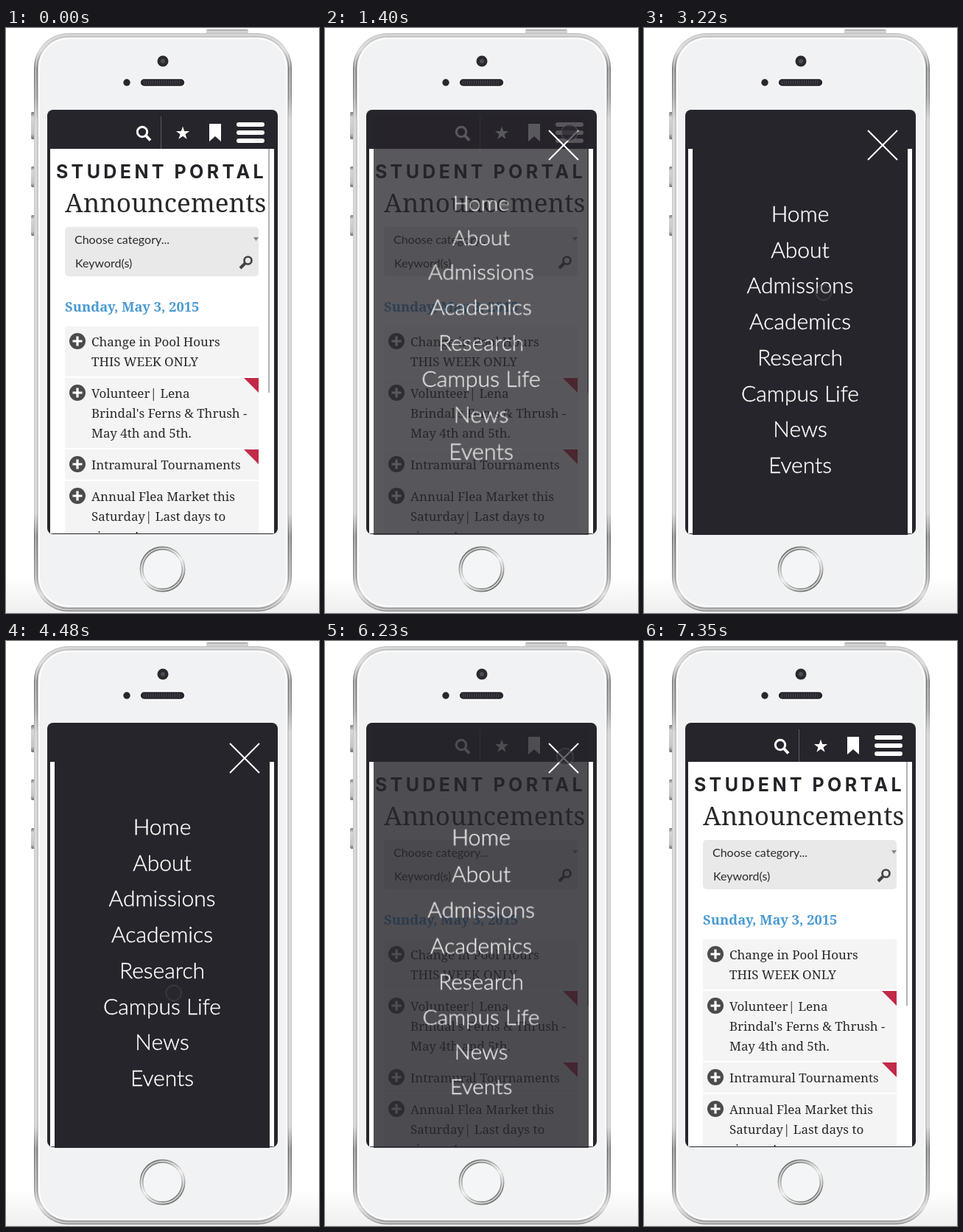
An HTML page that plays this animation: 425 px wide and 794 px high, repeating every 8960 ms.

```html
<!DOCTYPE html>
<html lang="en">
<head>
<meta charset="utf-8">
<title>Student portal menu</title>
<style>
  html, body { margin: 0; width: 100%; height: 100%; overflow: hidden; background: #fff; }
  svg, #overlay, #nav { position: absolute; left: 0; top: 0; }
  svg { width: 425px; height: 794px; }
  .serif { font: 17px "Noto Serif", serif; fill: #29292c; }
  .sans { font: 16px Lato, sans-serif; fill: #2b2b2d; }
  .brand { font: 700 25px Inter, sans-serif; letter-spacing: 4.4px; fill: #242428; }
  #overlay { left: 66px; top: 120px; width: 292px; height: 568px; background: #26252b; overflow: hidden; opacity: 0; }
  #nav { top: 106.5px; width: 292px; height: 390px; perspective: 1200px; }
  #menu {
    font: 300 30px/48.7px Lato, sans-serif; color: #fff; -webkit-text-stroke: .4px #fff;
    text-align: center; white-space: nowrap;
  }
</style>
</head>
<body>
<svg viewBox="0 0 425 794">
  <defs>
    <linearGradient id="floor" x2="0" y2="1">
      <stop stop-color="#fff"/><stop offset="1" stop-color="#efefef"/>
    </linearGradient>
    <linearGradient id="metal" x2="0" y2="1">
      <stop stop-color="#c2c2c2"/><stop offset=".03" stop-color="#d8d8d8"/>
      <stop offset=".06" stop-color="#777"/><stop offset=".11" stop-color="#8c8c8c"/>
      <stop offset=".15" stop-color="#cbcbcb"/><stop offset=".83" stop-color="#cbcbcb"/>
      <stop offset=".87" stop-color="#6e6e6e"/><stop offset=".94" stop-color="#9a9a9a"/>
      <stop offset=".97" stop-color="#dcdcdc"/><stop offset="1" stop-color="#8a8a8a"/>
    </linearGradient>
    <linearGradient id="key" x2="0" y2="1">
      <stop stop-color="#777"/><stop offset=".2" stop-color="#d6d6d6"/>
      <stop offset=".8" stop-color="#c4c4c4"/><stop offset="1" stop-color="#6c6c6c"/>
    </linearGradient>
    <linearGradient id="ring" x2=".6" y2="1">
      <stop stop-color="#555"/><stop offset=".3" stop-color="#999"/>
      <stop offset=".6" stop-color="#e6e6e6"/><stop offset="1" stop-color="#777"/>
    </linearGradient>
    <clipPath id="screen"><rect x="56" y="111" width="313" height="576" rx="8"/></clipPath>
    <clipPath id="field"><path d="M80 300H171V337H80Z"/></clipPath>
  </defs>

  <path d="M0 745H425V794H0Z" fill="url(#floor)"/>
  <g fill="url(#key)">
    <rect x="272" y="2" width="57" height="9" rx="2"/>
    <rect x="34" y="114" width="7" height="37" rx="2"/>
    <rect x="34" y="188" width="7" height="28" rx="2"/>
    <rect x="34" y="254" width="7" height="28" rx="2"/>
  </g>
  <rect x="38" y="7" width="350" height="785" rx="47" fill="url(#metal)"/>
  <rect x="40.500" y="9.500" width="345" height="780" rx="44.500" fill="none" stroke="#e9e9e9" stroke-width="2" stroke-opacity=".65"/>
  <rect x="43.500" y="12.500" width="339" height="774" rx="41.500" fill="#f1f2f3" stroke="#c6c6c7"/>
  <rect x="45" y="14" width="336" height="771" rx="40" fill="none" stroke="#fff" stroke-width="2"/>

  <circle cx="213" cy="45" r="7.500" fill="#2a2a2d"/>
  <circle cx="213" cy="45" r="3" fill="#4c4c55"/>
  <circle cx="164" cy="74" r="4.700" fill="#28282b"/>
  <rect x="182" y="68.500" width="61" height="11" rx="5.500" fill="#29282e" stroke="#fff" stroke-width="1.500"/>
  <path d="M187 74H238" stroke="#45444b" stroke-width="5" stroke-dasharray="1 2"/>
  <circle cx="212.500" cy="734.500" r="28.500" fill="#f4f5f6" stroke="url(#ring)" stroke-width="5"/>
  <circle cx="212.500" cy="734.500" r="28.500" fill="none" stroke="#fff" stroke-opacity=".7" stroke-width="1.500"/>

  <g clip-path="url(#screen)">
    <path d="M56 111H369V688H56Z" fill="#26252b"/>
    <path d="M60 164H364V686H60Z" fill="#fff"/>
    <path d="M210.500 120V164" stroke="#5c5b61"/>
    <g fill="none" stroke="#fff" stroke-width="3">
      <circle cx="185" cy="141" r="6.700"/>
      <path d="M190 146L196 152.500" stroke-width="4"/>
    </g>
    <path id="star" fill="#fff"/>
    <path d="M276 130H292V154L284 147L276 154Z" fill="#fff"/>

    <text class="brand" x="68" y="204">STUDENT</text>
    <text class="brand" x="228.500" y="204">PORTAL</text>
    <text class="serif" x="80" y="250" style="font-size:35px">Announcements</text>
    <rect x="80" y="270" width="263" height="67" rx="5" fill="#e9e9e9"/>
    <text class="sans" x="93" y="293">Choose category...</text>
    <text class="sans" x="94" y="325" clip-path="url(#field)">Keyword(s)</text>
    <path d="M336 284H343L339.500 289Z" fill="#858585"/>
    <circle cx="328.500" cy="315.500" r="5" fill="none" stroke="#444" stroke-width="2.700"/>
    <path d="M324.500 319.500L318 326" stroke="#444" stroke-width="4"/>
    <text class="serif" x="80" y="385" style="font-size:18.4px;font-weight:700;fill:#4a9ad2">Sunday, May 3, 2015</text>
    <g id="list"></g>
    <path d="M357 164V495" stroke="#b3b3b3" stroke-width="2"/>
    <path d="M66 686.500H361" stroke="#26252b"/>
  </g>
</svg>

<div id="overlay"><div id="nav"><div id="menu"></div></div></div>

<svg viewBox="0 0 425 794">
  <path id="burger" d="M316 131H348M316 142H348M316 153H348" stroke="#fff" stroke-width="6" stroke-linecap="round"/>
  <g fill="none" stroke="#fff" stroke-width="2">
    <path id="crossTop" d="M304 139L324 159L344 139"/>
    <path id="crossBottom" d="M304 179L324 159L344 179"/>
  </g>
  <g id="cursor">
    <circle id="dot" r="10.500" fill="#2c2b31" stroke="#8a8a8e" stroke-opacity=".4"/>
  </g>
</svg>

<script>
const LOOP = 8960, STEP = 70;
const $ = id => document.getElementById(id);

$('menu').innerHTML = ['Home', 'About', 'Admissions', 'Academics', 'Research', 'Campus Life', 'News', 'Events']
  .map(label => `<div>${label}</div>`).join('');

$('star').setAttribute('d', 'M' + Array.from({ length: 10 }, (_, i) => {
  const radius = i % 2 ? 3.7 : 9.5, angle = (i * 36 - 90) * Math.PI / 180;
  return `${240 + radius * Math.cos(angle)} ${143 + radius * Math.sin(angle)}`;
}).join('L') + 'Z');

// top, height, flagged, lines
const items = [
  [405, 68, false, ['Change in Pool Hours', 'THIS WEEK ONLY']],
  [475, 95, true, ['Volunteer| Lena', "Brindal's Ferns &amp; Thrush -", 'May 4th and 5th.']],
  [572, 41, true, ['Intramural Tournaments']],
  [615, 71, false, ['Annual Flea Market this', 'Saturday| Last days to', 'sign up!']]
];
$('list').innerHTML = items.map(([top, height, flagged, lines]) => `
  <path d="M80 ${top}h263v${height}h-263z" fill="#f4f4f4"/>
  ${flagged ? `<path d="M323 ${top}h20v20z" fill="#c12a48"/>` : ''}
  <circle cx="97" cy="${top + 20}" r="11" fill="#4b4b4d"/>
  <path d="M90.5 ${top + 20}h13m-6.500 -6.500v13" stroke="#fff" stroke-width="3.200"/>
  ${lines.map((line, i) => `<text class="serif" x="116" y="${top + 27 + i * 27}">${line}</text>`).join('')}
`).join('');

const tracks = [];

// Each step is [ms, properties, easing to the next step].
function track(id, ...steps) {
  const first = steps[0], last = steps[steps.length - 1];
  const frames = [[0, first[1]], ...steps, [LOOP, last[1]]]
    .map(([ms, props, easing = 'linear']) => ({ offset: ms / LOOP, easing, ...props }));
  const animation = $(id).animate(frames, { duration: LOOP, fill: 'both' });
  animation.pause();
  tracks.push(animation);
}

const OPEN = 1190, OPENED = 1640, CLOSE = 6155, CLOSED = 6660, SWAP = 6300;
const shown = { opacity: 1 }, hidden = { opacity: 0 };
const tilt = (y, deg, opacity) => ({ transform: `translateY(${y}px) rotateX(${deg}deg)`, opacity });

track('overlay', [OPEN, hidden, 'ease'], [OPENED, shown], [CLOSE, shown, 'ease'], [CLOSED, hidden]);
track('menu',
  [OPEN, tilt(-85, 35, .4), 'ease'], [OPENED, tilt(0, 0, 1)],
  [CLOSE, tilt(0, 0, 1), 'ease'], [CLOSED, tilt(85, -35, .4)]);
track('burger', [OPEN, shown, 'ease'], [OPENED, hidden], [SWAP, hidden], [SWAP, shown]);
track('crossTop', [OPEN, hidden], [1360, shown], [SWAP, shown], [SWAP, hidden]);
track('crossBottom', [OPEN, hidden], [1360, shown], [6380, shown], [6600, hidden]);

const at = (x, y, opacity = 1) => ({ transform: `translate(${x}px, ${y}px)`, opacity });
track('cursor',
  [0, at(347, 151, .1)], [350, at(332, 142)],
  [2240, at(332, 142)], [2940, at(247, 293)],
  [3150, at(247, 293)], [3220, at(244, 359)], [3600, at(256, 480)], [3990, at(241, 573)],
  [4060, at(241, 573)], [4200, at(236, 589)], [4600, at(224, 430)], [4970, at(268, 252)],
  [5110, at(286, 214)], [5320, at(286, 214)], [5740, at(326, 157)],
  [7140, at(326, 157)], [7350, at(347, 158, 0)]);

const idle = { transform: 'scale(1)', fillOpacity: .35 };
const pressed = { transform: 'scale(1.06)', fillOpacity: .7 };
track('dot',
  [700, idle], [700, pressed], [1540, pressed], [1540, idle],
  [6020, idle], [6020, pressed]);

const start = performance.now();
function render() {
  const time = (performance.now() - start) % LOOP;
  const tick = Math.floor(time / STEP) * STEP;
  for (const animation of tracks) animation.currentTime = tick;
  requestAnimationFrame(render);
}
render();
</script>
</body>
</html>
```
